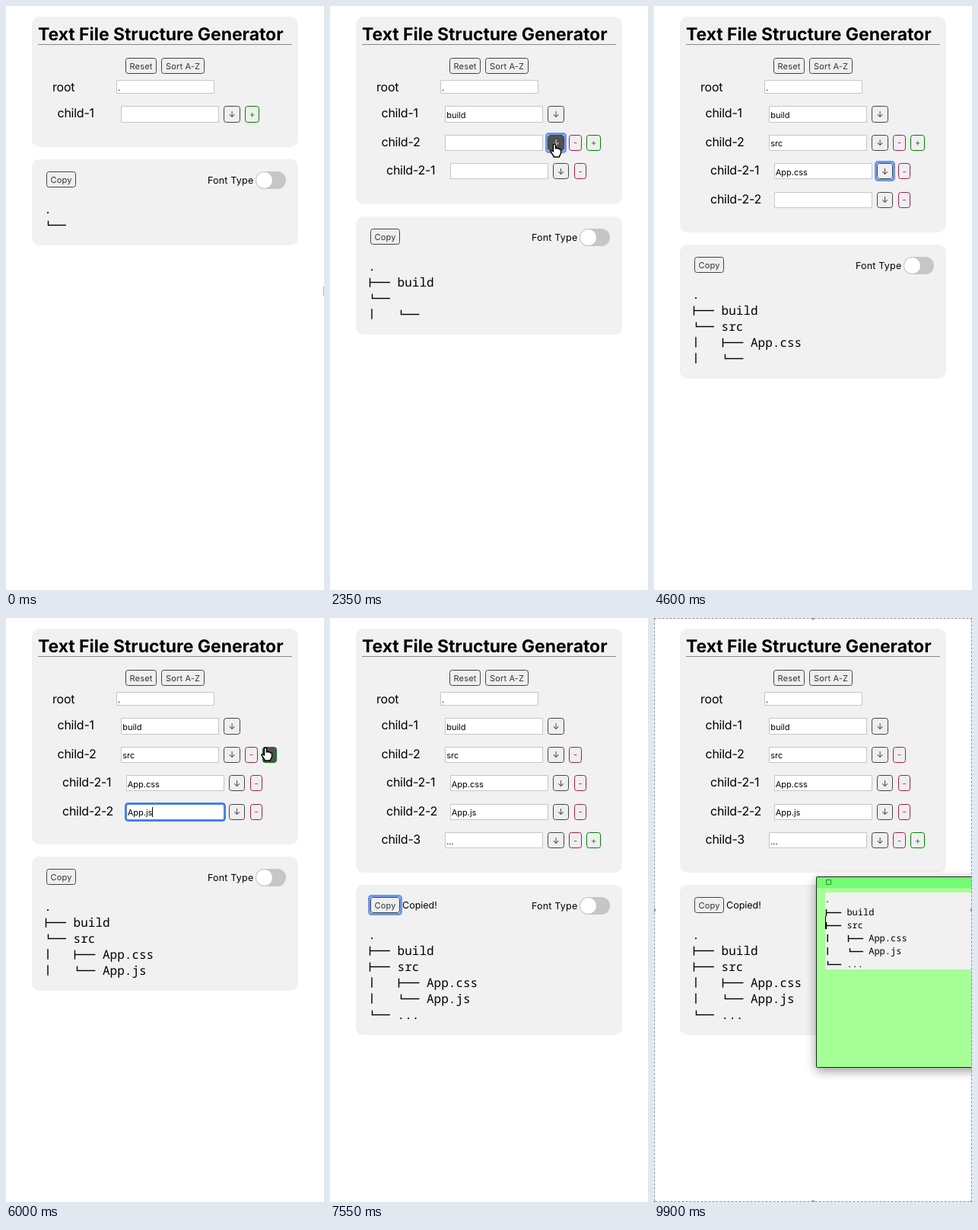
An HTML page with a canvas for the animation above (10000 ms loop, 418 by 766 pixels).

```html
<!DOCTYPE html>
<html lang="en">
<head>
<meta charset="utf-8">
<title>Text File Structure Generator</title>
<style>
  html, body { margin: 0; width: 100%; height: 100%; overflow: hidden; background: #fff; }
  canvas { display: block; }
</style>
</head>
<body>
<canvas id="stage" width="418" height="766"></canvas>
<script>
const ctx = document.getElementById('stage').getContext('2d');
ctx.textRendering = 'geometricPrecision';
const SANS = 'Inter, sans-serif', MONO = '"Noto Sans Mono", monospace';
const GREY = '#444', RED = '#a01c4c', GREEN = '#008000';
const LOOP = 10000, STEP = 50;

// typing starts and ends at a, b; the row exists from time "from"
const ROWS = [
  { label: 'child-1', from: 0, text: 'build', a: 850, b: 1050 },
  { label: 'child-2', from: 1700, text: 'src', a: 3000, b: 3150 },
  { label: 'child-2-1', nested: true, from: 2300, text: 'App.css', a: 4100, b: 4450 },
  { label: 'child-2-2', nested: true, from: 2500, text: 'App.js', a: 4850, b: 5250 },
  { label: 'child-3', from: 6250, text: '...', a: 6800, b: 6950 },
];
// [time, row index + part]
const FOCUS = [[0, ''], [350, '0i'], [1550, '0+'], [2250, '1↓'], [2850, '1i'], [3850, '2i'],
  [4550, '2↓'], [4700, '2-'], [4800, '3i'], [6200, '1+'], [6600, '4i'], [7450, 'copy'], [7950, '']];
const CARET_OFF = [[650, 850], [3350, 3600], [9650, 9850]];
// visible stretches of the pointer: [time, x, y]
const POINTER = [
  [[0, 417, 366], [150, 340, 250], [350, 232, 146], [850, 232, 146]],
  [[1050, 306, 142], [1300, 306, 142], [1400, 313, 158], [1550, 324, 145], [1700, 324, 145],
   [2000, 295, 181], [2450, 295, 181], [2550, 327, 249], [2700, 327, 249], [2750, 280, 200],
   [2850, 250, 180], [3000, 250, 180]],
  [[3550, 250, 180], [3850, 240, 218], [4100, 240, 218]],
  [[5300, 240, 218], [5600, 300, 160], [5800, 338, 133], [6000, 341, 170], [6250, 344, 172],
   [6550, 205, 291], [6800, 205, 291]],
  [[7000, 205, 291], [7400, 72, 377], [7550, 72, 377]],
  [[8100, 400, 635], [8300, 337, 368], [8450, 337, 368], [8600, 330, 347], [8650, 330, 347],
   [8850, 311, 345], [9100, 425, 400]],
];
const SHAPES = {
  arrow: new Path2D('M0 0V16L4 12.5 6.5 18 9 17 6.5 11.5H11.5Z'),
  hand: new Path2D('M-1.5 8V1Q0-1 1.5 1V6Q3 4.6 4 6Q5.6 5 6.5 7Q8 6 8.5 8V12Q8 14 6.5 16V17H-1V16Q-3 13-5 10Q-5 8-3 9L-1.5 10Z'),
  beam: new Path2D('M-3-7Q0-7 0-5V5Q0 7-3 7M3-7Q0-7 0-5M0 5Q0 7 3 7M-2 1H2'),
};

let time, pointer, kind, focus, caretOn;

// edges snap to whole pixels
function box(x, y, w, h, fill, stroke, r = 0, line = 1) {
  const inset = stroke ? line / 2 : 0;
  const left = Math.round(x), top = Math.round(y);
  const width = Math.round(x + w) - left, height = Math.round(y + h) - top;
  ctx.beginPath();
  ctx.roundRect(left + inset, top + inset, width - 2 * inset, height - 2 * inset, r);
  if (fill) { ctx.fillStyle = fill; ctx.fill(); }
  if (stroke) { ctx.strokeStyle = stroke; ctx.lineWidth = line; ctx.stroke(); }
}

function text(str, x, y, size, { color = '#000', weight = 400, space = 0, font = SANS, align = 'left' } = {}) {
  ctx.font = `${weight} ${size}px ${font}`;
  ctx.letterSpacing = space + 'px';
  ctx.textAlign = align;
  ctx.fillStyle = color;
  ctx.fillText(str, x, y);
  return ctx.measureText(str).width;
}

function segment(x1, y1, x2, y2, color = '#000', width = 1.4) {
  ctx.beginPath();
  ctx.moveTo(x1, y1);
  ctx.lineTo(x2, y2);
  ctx.strokeStyle = color;
  ctx.lineWidth = width;
  ctx.stroke();
}

const over = (x, y, w, h) => pointer && pointer[0] >= x && pointer[0] <= x + w
  && pointer[1] >= y && pointer[1] <= y + h;

const ring = (x, y, w, h, out, color) =>
  box(x - out, y - out, w + 2 * out, h + 2 * out, null, color, 3, 3);

function button(id, str, x, y, w, h, color = GREY) {
  const hot = over(x, y, w, h);
  if (hot) kind = 'hand';
  if (focus === id) ring(x, y, w, h, 3, '#6c98ee');
  box(x, y, w, h, hot ? '#505050' : '#efefef', color, 3);
  const ink = hot ? '#fff' : color === GREY ? '#333' : color;
  text(str, x + w / 2, y + h / 2 + 4, 11, { color: ink, align: 'center', space: str.length > 1 ? 0.15 : 0 });
}

function input(id, str, x, y, w, h) {
  if (over(x, y, w, h)) kind = 'beam';
  box(x, y, w, h, '#fff', '#c6c6c6');
  if (focus === id) ring(x, y, w, h, 2, '#4a80e4');
  const end = x + 2 + text(str, x + 2, Math.round(y + h / 2 + 5), 11);
  if (focus === id && caretOn) {
    const caretX = Math.round(end) + 0.5;
    segment(caretX, Math.round(y) + 4, caretX, Math.round(y) + 17, '#000', 1);
  }
}

function typed({ text, a, b }) {
  if (time < a) return '';
  return text.slice(0, 1 + Math.floor((time - a) / (b - a) * (text.length - 1)));
}

// mid is the centre line of the root entry
function tree(rows, x, mid, size, pitch) {
  const cell = size * 0.6, style = { font: MONO };
  const lastTop = rows.findLastIndex(r => !r.nested), lastNested = rows.findLastIndex(r => r.nested);
  const half = size * 0.42;
  text('.', x, mid + size * 0.36, size, style);
  rows.forEach((row, i) => {
    const y = mid + pitch * (i + 1), left = x + (row.nested ? 4 * cell : 0);
    const last = i === (row.nested ? lastNested : lastTop);
    const stem = Math.floor(left + cell * (last ? 0.5 : 0.24)) + 0.5, bar = y + 0.5;
    if (row.nested) segment(x + cell / 2, y - half, x + cell / 2, y + half);
    segment(stem, y - half * 0.8, stem, last ? bar + 0.7 : y + half);
    segment(stem, bar, left + 3 * cell, bar);
    text(typed(row), left + 4 * cell, y + size * 0.36, size, style);
  });
}

function form(rows) {
  const drop = Math.round(37.3 * (rows.length - 1));
  box(34, 14, 350, 171 + drop, '#f1f1f1', null, 10);
  text('Text File Structure Generator', 42, 45, 23, { weight: 700, space: -0.05 });
  segment(42, 50.5, 376, 50.5, '#888', 1);
  button('reset', 'Reset', 157, 68, 41, 21);
  button('sort', 'Sort A-Z', 204, 68, 57, 21);
  text('root', 61, 112, 16, { space: -0.2 });
  input('root', '.', 145, 97, 129, 18);

  const lastTop = rows.findLastIndex(r => !r.nested);
  rows.forEach((row, i) => {
    const y = 131.4 + 37.4 * i, h = 21.2, shift = row.nested ? 6.5 : 0;
    text(row.label, 67.5 + shift, Math.round(y) + 15, 16, { space: -0.25 });
    input(i + 'i', typed(row), 151.2 + shift, y, 129, h);
    button(i + '↓', '↓', 286.3 + shift, y, 21.4, h);
    if (i) button(i + '-', '-', 314.2 + shift, y, 16.5, h, RED);
    if (i === lastTop) button(i + '+', '+', i ? 337.2 : 314.2, y, 18.7, h, GREEN);
  });
  return 201 + drop;
}

function output(rows, top) {
  box(34, top, 350, 92 + 21 * rows.length, '#f1f1f1', null, 10);
  button('copy', 'Copy', 53, top + 16, 39, 21);
  if (time >= 7500) text('Copied!', 95, top + 31, 12.5);
  text('Font Type', 265, top + 32, 12.5, { space: 0.2 });
  box(328, top + 16, 40, 23, '#c6c6c6', null, 11.5);
  box(329, top + 17, 21, 21, '#fff', null, 10.5);
  tree(rows, 50.2, top + 65, 16, 21);
}

function note(rows) {
  const drag = Math.min(1, Math.max(0, (time - 8650) / 200));
  const x = Math.round(232 - 19 * drag), y = Math.round(341 - 2 * drag);
  const pasted = time >= 8450;
  ctx.save();
  ctx.shadowColor = 'rgba(0,0,0,.4)';
  ctx.shadowBlur = 14;
  ctx.shadowOffsetY = 4;
  box(x, y, 240, 251, '#a6ff96', null, 1);
  ctx.restore();
  box(x, y, 240, 15, '#72fb74');
  box(x, y, 240, 251, null, '#142814', 1);
  box(x + 13, y + 4, 7, 7, null, '#23982b');
  if (pasted) {
    box(x + 12, y + 21, 240, 101, '#f1f1f1');
    tree(rows, x + 11.6, y + 30, 12, 17);
  }
  if (caretOn) {
    const caretY = y + (pasted ? 52 : 20);
    segment(x + 12.5, caretY, x + 12.5, caretY + 17, '#000', 1);
  }
  if (over(x, y, 240, 251)) kind = pointer[1] < y + 15 ? 'arrow' : 'beam';
}

function findPointer() {
  const path = POINTER.find(p => time >= p[0][0] && time < p.at(-1)[0]);
  if (!path) return null;
  const i = path.findIndex(p => p[0] > time);
  const [t0, x0, y0] = path[i - 1], [t1, x1, y1] = path[i];
  const k = (time - t0) / (t1 - t0);
  return [x0 + (x1 - x0) * k, y0 + (y1 - y0) * k];
}

function drawPointer() {
  const shape = SHAPES[kind];
  ctx.save();
  ctx.translate(...pointer);
  ctx.lineJoin = 'round';
  ctx.strokeStyle = kind === 'hand' ? '#000' : '#fff';
  ctx.lineWidth = kind === 'beam' ? 3 : 1.4;
  ctx.fillStyle = kind === 'hand' ? '#fff' : '#000';
  if (kind !== 'beam') ctx.fill(shape);
  ctx.stroke(shape);
  if (kind === 'beam') {
    ctx.strokeStyle = '#000';
    ctx.lineWidth = 1.2;
    ctx.stroke(shape);
  }
  ctx.restore();
}

function selection() {
  ctx.setLineDash([3, 2]);
  box(0, 0, 418, 766, null, '#8c8c8c');
  ctx.setLineDash([]);
  for (const x of [0, 209, 418]) for (const y of [0, 383, 766]) {
    if (x !== 209 || y !== 383) box(x - 3, y - 3, 6, 6, '#888', '#ddd', 3);
  }
}

function frame(now) {
  time = Math.floor(now % LOOP / STEP) * STEP;
  pointer = findPointer();
  kind = 'arrow';
  focus = FOCUS.findLast(f => time >= f[0])[1];
  caretOn = !CARET_OFF.some(([a, b]) => time >= a && time < b);
  const rows = ROWS.filter(r => time >= r.from);

  ctx.fillStyle = '#fff';
  ctx.fillRect(0, 0, 418, 766);
  output(rows, form(rows));
  if (time >= 7950) note(rows);
  if (pointer) drawPointer();
  if (time >= 9350) selection();
}

const start = performance.now();
function tick() {
  frame(performance.now() - start);
  requestAnimationFrame(tick);
}
tick();
</script>
</body>
</html>
```
